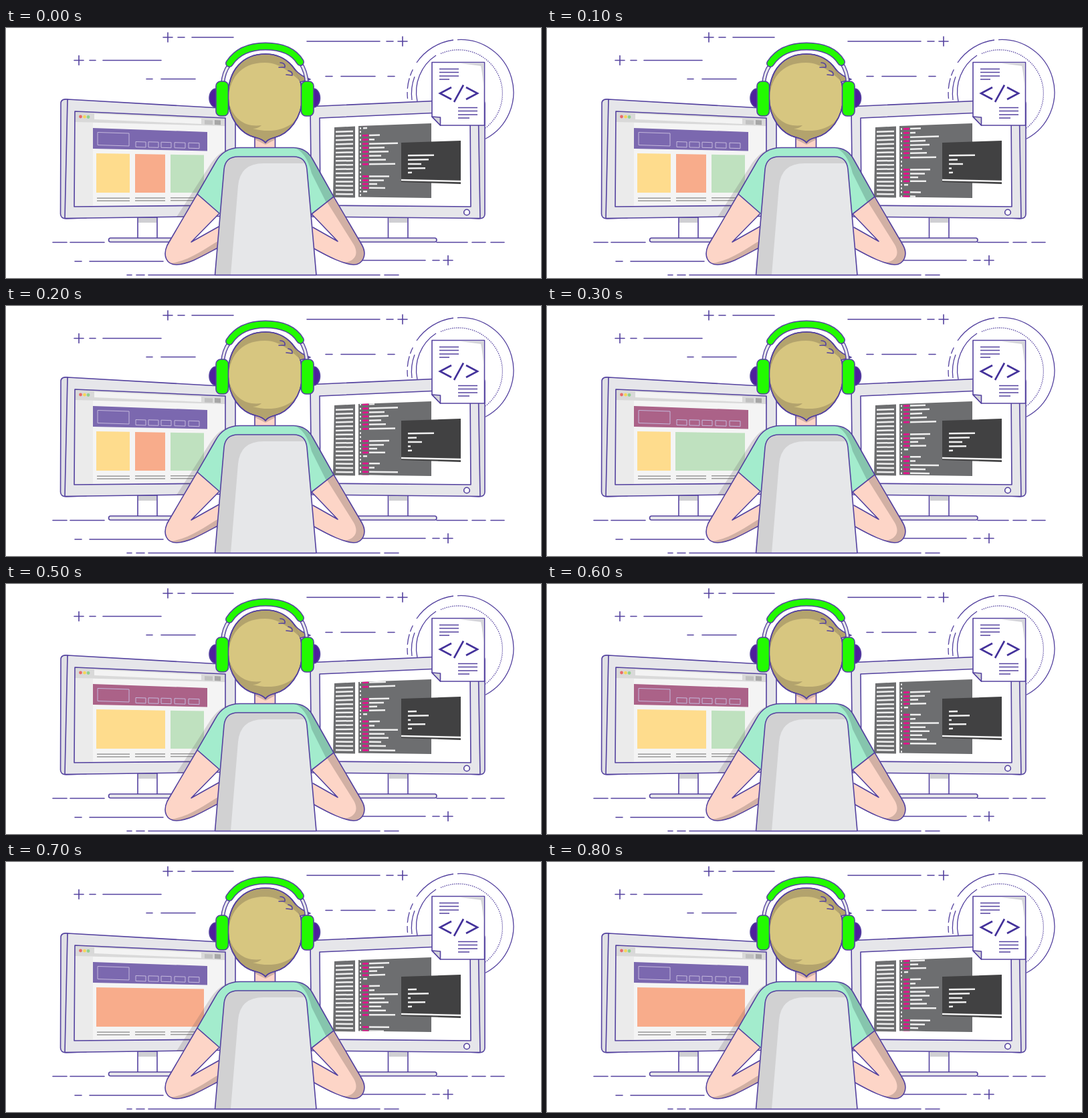
These frames come from a looping animation (800 by 375 pixels, 900 ms). An HTML page:

```html
<!DOCTYPE html>
<html lang="en">
<head>
<meta charset="utf-8">
<title>Programmer at work</title>
<style>
  html, body { margin: 0; width: 100%; height: 100%; overflow: hidden; background: #fff; }
  svg { display: block; width: 100vw; height: 100vh; }
  .ink { stroke: #54429f; stroke-width: 1.6; stroke-linejoin: round; stroke-linecap: round; }
  .line { fill: none; }
  .metal { fill: #e6e6ea; }
  .skin { fill: #fdd5c7; }
  .skin-shade { fill: #d1b0a4; }
  .green { fill: #22fb00; }
  .panel { fill: #6d6e70; }
  .text { fill: none; stroke: #efefef; stroke-width: 2.5; }
</style>
</head>
<body>
<svg viewBox="0 0 800 375" preserveAspectRatio="none">
  <defs>
    <clipPath id="codeArea"><path d="M527 147L636 143V255L527 253.5Z"/></clipPath>
    <clipPath id="screenArea"><path d="M103 125L328 135V268H102Z"/></clipPath>
    <clipPath id="monitorArea"><path d="M92 107L343 122V283L88 285.500Z"/></clipPath>
  </defs>

  <!-- background strokes -->
  <path class="ink line" d="M235 14H249M242 7V21M257 14H267M278 14H340
    M102 48.500H116M109 41.500V55.500M125 48.500H134M145 48.500H232M210 76.500H219M232 76.500H283
    M450 20H559M569 20H579M586 20H600M593 13V27M478 72.500H488M501 72.500H552M571 72.500H581
    M70 321.500H91M96 321.500H147M644 321.500H690M697 321.500H717M725 321.500H745
    M103 350H113M125 350H235M531 348.500H627M638 348.500H648M654 348.500H668M661 341.500V355.500
    M181 370.500H188M195 370.500H207M213 370.500H559M566 370.500H587"/>

  <!-- badge rings -->
  <g class="line" stroke="#54429f" stroke-width="1.3">
    <path d="M675 17.600A79 79 0 0 1 717 166.200"/>
    <path d="M614 52A79 79 0 0 1 669 18"/>
    <path d="M600.500 106A79 79 0 0 1 609 61" stroke-dasharray="10 5 16 4"/>
    <path d="M650 38.500A65.500 65.500 0 0 1 717 150" stroke-dasharray="1.500 1.500"/>
    <path d="M607 108A72 72 0 0 1 611 73"/>
    <path d="M615 110A66 66 0 0 1 643 41"/>
  </g>

  <!-- left monitor -->
  <path class="ink" fill="#fff" d="M197 284H226V316H197Z"/>
  <path fill="#cfcfd3" d="M198 285H225V292H198Z"/>
  <rect class="ink metal" x="153.500" y="315" width="110" height="6" rx="3"/>
  <path class="ink" fill="#e0e0e5" d="M92 107Q82 106 82 113L81.500 279Q82 286 90 286L120 285Z"/>
  <path class="ink metal" d="M92 107L338 121Q343 122 343 127V282L88 285.500Z"/>
  <path fill="#f4f4f4" d="M103 125L328 135V266L102 268Z"/>
  <g clip-path="url(#screenArea)">
    <path fill="#ebebeb" d="M102 140L130 142V268H102Z"/>
    <path fill="#d9d9d9" d="M102 124L329 135V147L102 141Z"/>
    <path fill="#f3f3f3" d="M132 128.500L292 136V144L132 137Z"/>
    <path fill="#c1c1c1" d="M297 138L309 138.500V145L297 144.500Z"/>
    <path fill="#a6a6a6" d="M312 138L321 138.500V145.500L312 145Z"/>
    <circle cx="111.500" cy="133" r="2.400" fill="#e86a6a"/>
    <circle cx="117.500" cy="133.200" r="2.400" fill="#f5d65b"/>
    <circle cx="123" cy="133.500" r="2.400" fill="#8fd08f"/>
    <path id="header" d="M130 150L301 156V184.500L130 181Z"/>
    <path class="line" stroke="#c5b9dc" stroke-width="1" d="M137 156.500L184 158V177L137 175.500ZM194 170.500L209 171V179L194 178.500ZM213 170.800L228 171.200V179.300L213 179ZM232 171.200L247 171.700V179.700L232 179.300ZM252 171.700L268 172.200V180.200L252 179.700ZM273 172.200L289 172.700V180.700L273 180.200Z"/>
    <g id="blocks"></g>
    <path class="line" stroke="#999" stroke-width="1.600" d="M136 255.300H185M136 259.300H185M193 255H238M193 259H238M246 254.700H290M246 258.700H290"/>
  </g>
  <path class="ink line" d="M103 125L328 135V266L102 268Z"/>

  <!-- right monitor -->
  <path class="ink" fill="#fff" d="M571.500 284H601V316H571.500Z"/>
  <path fill="#cfcfd3" d="M572.500 285H600V292H572.500Z"/>
  <rect class="ink metal" x="500" y="315" width="144" height="6" rx="3"/>
  <path class="ink" fill="#e0e0e5" d="M704 107Q716 106 716 114V279Q716 286 707 286L690 285Z"/>
  <path class="ink metal" d="M455 121Q455 118 460 117.500L706 106.500L709 285.500L457 283Z"/>
  <path class="ink" fill="#fff" d="M469 135L694 125L695 268L470 266Z"/>
  <circle class="ink" cx="689" cy="276.500" r="4.300" fill="#fff"/>
  <path class="panel" d="M491 149L522 147.500V254.500L489 254Z"/>
  <path id="sidebar" class="text"/>
  <path class="panel" d="M527 147L636 143V255L527 253.500Z"/>
  <g clip-path="url(#codeArea)">
    <path id="codeText" class="text"/>
    <path id="codeKeys" class="line" stroke="#e0148c" stroke-width="2.800"/>
  </g>
  <path fill="#414142" d="M591 172L680 169V234L591 231Z"/>
  <path class="line" stroke="#f4f4f4" stroke-width="2.600" d="M591 228L680 230"/>
  <path id="terminal" class="text"/>

  <!-- document -->
  <path class="ink" fill="#fff" d="M637 51.500H715.500V146H649.500L637 133Z"/>
  <path fill="#d5d5da" d="M676 52.500H714.500V95Q713 70 710 57Z"/>
  <path class="ink" fill="#d5d5da" d="M637 133L649.500 134V146Z"/>
  <path class="line" stroke="#54429f" stroke-width="1.700" d="M648 61.500H677M648 66.500H677M648 72H677M648 77H663M676 119.500H705M676 124.500H705M676 130H705M676 135H693"/>
  <path class="line" stroke="#43319a" stroke-width="2.600" d="M666 89L649 98L666 107M684 85.500L670 111M688 89L705 98L688 107"/>

  <!-- person -->
  <path clip-path="url(#monitorArea)" fill="#5a505a" opacity=".2" d="M352 179C326 178 314 192 304 207L238 310V326L286 250L330 186Z"/>
  <g id="arms">
    <path class="skin" d="M286 249L241 326C234 342 240 355 255 355C274 354 292 343 318 329V298L277 321L319 278Z"/>
    <path class="skin-shade" d="M246 353C252 356 262 355 271 352C288 346 302 337 318 329V319C296 332 274 349 246 353Z"/>
    <path class="ink line" d="M286 249L241 326C234 342 240 355 255 355C274 354 292 343 318 329M318 298L277 321L319 278"/>
    <path class="skin" d="M490 253L532 325C541 341 533 355 520 355C504 354 484 344 459 330V299L496 320L457 279Z"/>
    <path class="skin-shade" d="M490 253L532 325C541 341 533 355 520 355Q513 355 505 352C522 350 528 339 520 325L480 261Z"/>
    <path class="ink line" d="M490 253L532 325C541 341 533 355 520 355C504 354 484 344 459 330M459 299L496 320L457 279"/>
  </g>
  <path class="skin" d="M372 158H403V182H372Z"/>
  <path class="skin-shade" d="M372 160H403V167L388 175L372 167Z"/>
  <path class="ink line" d="M372 164V180M402.500 164V180"/>
  <path fill="#a3eccd" d="M286 249L313 202Q325 179.500 350 179.500H430Q449 180 458 196L490 253L457 279H319Z"/>
  <path fill="#86c5ad" d="M430 179.500Q449 180 458 196L490 253L479 262L457 218Q449 185 430 179.500Z"/>
  <path class="ink line" d="M319 278L286 249L313 202Q325 179.500 350 179.500H430Q449 180 458 196L490 253L457 279"/>

  <!-- chair -->
  <path fill="#e6e7e9" d="M312.500 370.500L326 212Q328 193 347 193H430Q448 193 450 212L464 370.500Z"/>
  <path fill="#d1d1d2" d="M312.500 370.500L326 212Q328 193 347 193H430Q444 193 448.500 203H385Q350 203 347 237L336 370.500Z"/>
  <path class="ink line" d="M312.500 370.500L326 212Q328 193 347 193H430Q448 193 450 212L464 370.500Z"/>

  <!-- head -->
  <path id="hair" fill="#b3a36d" d="M332 103C332 62 355 39 388 39C420 39 443 64 443 103C443 135 423 159 401 164.500Q391 167 388 172Q384 167 374 164.500C350 159 332 135 332 103Z"/>
  <path fill="#d7c680" d="M332.500 110C333 78 349 52 387 52C402 52 412 58 422 65Q433 73 440 80C446 107 441 131 428 143C411 156 388 156 369 151Q377 151 382 146C357 149 340 137 332.500 110Z"/>
  <use href="#hair" class="ink" fill-opacity="0"/>
  <path class="ink line" d="M332 103C332 62 355 39 388 39C420 39 443 64 443 103C443 135 423 159 401 164.500Q391 167 388 172Q384 167 374 164.500C350 159 332 135 332 103Z"/>
  <path class="ink" fill="#b3a36d" d="M431 61Q440 72 455 77L440 81"/>
  <path class="ink line" d="M410 52Q418 52 417 59L408 59M422 64Q429 65 428 71L419 70"/>

  <!-- headphones -->
  <path class="line" stroke="#54429f" stroke-width="6" d="M334 55Q325 67 324 84M440 52Q449 65 450 84"/>
  <path class="line" stroke="#e6e6ea" stroke-width="3.200" d="M334 55Q325 67 324 84M440 52Q449 65 450 84"/>
  <g class="line" stroke-linecap="round">
    <path stroke="#54429f" stroke-width="12" d="M334 53C345 36 362 27.500 388 27.500C414 27.500 431 36 440 51"/>
    <path stroke="#22fb00" stroke-width="9" d="M334 53C345 36 362 27.500 388 27.500C414 27.500 431 36 440 51"/>
  </g>
  <ellipse class="ink" cx="314" cy="105" rx="10" ry="14" fill="#4f1f9d"/>
  <ellipse class="ink" cx="460" cy="105" rx="9.500" ry="14" fill="#4f1f9d"/>
  <rect class="ink green" x="314" y="80" width="18.500" height="52" rx="7"/>
  <rect class="ink green" x="441.500" y="80" width="18.500" height="52" rx="7"/>
</svg>
<script>
  const STEP = 100, STEPS = 9, SCROLL = 10, PERIOD = 95;
  const YELLOW = '#fedc8d', ORANGE = '#f8ac8b', GREEN = '#bfe1bf';
  const PURPLE = '#7b68af', MAUVE = '#ab6288';

  // [offset down the listing, right end]; 0 = blank line, 540 = closing mark
  const listing = [
    [0, 573], [6, 565], [11.5, 555], [17.3, 567], [22.7, 540], [28, 0],
    [33.7, 559], [40, 551], [46.3, 586], [52.3, 566], [58.3, 572], [64.3, 561],
    [70.3, 568], [76.8, 582], [83, 0], [89, 0]
  ];

  // page layouts: header colour, then [left, right, colour] blocks
  const layouts = [
    [PURPLE, [135, 185, YELLOW], [193, 238, ORANGE], [246, 296, GREEN]],
    [MAUVE, [135, 185, YELLOW], [192, 296, GREEN]],
    [MAUVE, [135, 238, YELLOW], [246, 296, GREEN]],
    [PURPLE, [135, 296, ORANGE]]
  ];
  const layoutAt = [0, 0, 0, 1, 1, 2, 2, 3, 3];

  const outputs = [
    [640, 632, 621, 627, 607],
    [640, 614, 622, 605, 607],
    [614, 632, 605, 627, 607]
  ];
  const outputAt = [0, 1, 1, 0, 0, 2, 2, 2, 0];

  const el = id => document.getElementById(id);
  const setPath = (id, d) => el(id).setAttribute('d', d);

  // A dash that follows the perspective of the right screen
  function dash(x1, x2, y, origin) {
    const slope = -0.035 + 0.047 * (y - 147) / 107;
    const at = x => (y + slope * (x - origin)).toFixed(2);
    return `M${x1} ${at(x1)}L${x2} ${at(x2)}`;
  }

  function drawCode(step) {
    let text = '', keys = '';
    for (let page = -1; page <= 1; page++) {
      for (const [offset, end] of listing) {
        const y = 222.5 + page * PERIOD + offset - step * SCROLL;
        if (y < 143 || y > 258) continue;
        text += dash(529, 531, y, 537);
        if (end === 540) text += dash(534, end, y, 537);
        else if (end) {
          keys += dash(533, 542, y, 537);
          text += dash(543, end, y, 537);
        }
      }
    }
    setPath('codeText', text);
    setPath('codeKeys', keys);
  }

  function drawPage([header, ...blocks]) {
    el('header').setAttribute('fill', header);
    el('blocks').innerHTML = blocks.map(([left, right, fill]) => {
      const top = x => 188 + (x - 135) * 0.016;
      return `<path fill="${fill}" d="M${left} ${top(left)}L${right} ${top(right)}V247H${left}Z"/>`;
    }).join('');
  }

  function drawTerminal(ends) {
    setPath('terminal', ends.map((end, i) => dash(601, end, 191.3 + i * 6.4, 601)).join(''));
  }

  setPath('sidebar', Array.from({ length: 16 }, (_, i) => dash(493, 519, 155.4 + i * 6.25, 506)).join(''));

  const start = performance.now();
  let shown = -1;
  function tick() {
    const step = Math.floor((performance.now() - start) / STEP) % STEPS;
    if (step !== shown) {
      shown = step;
      drawCode(step);
      drawPage(layouts[layoutAt[step]]);
      drawTerminal(outputs[outputAt[step]]);
    }
    requestAnimationFrame(tick);
  }
  tick();
</script>
</body>
</html>
```
